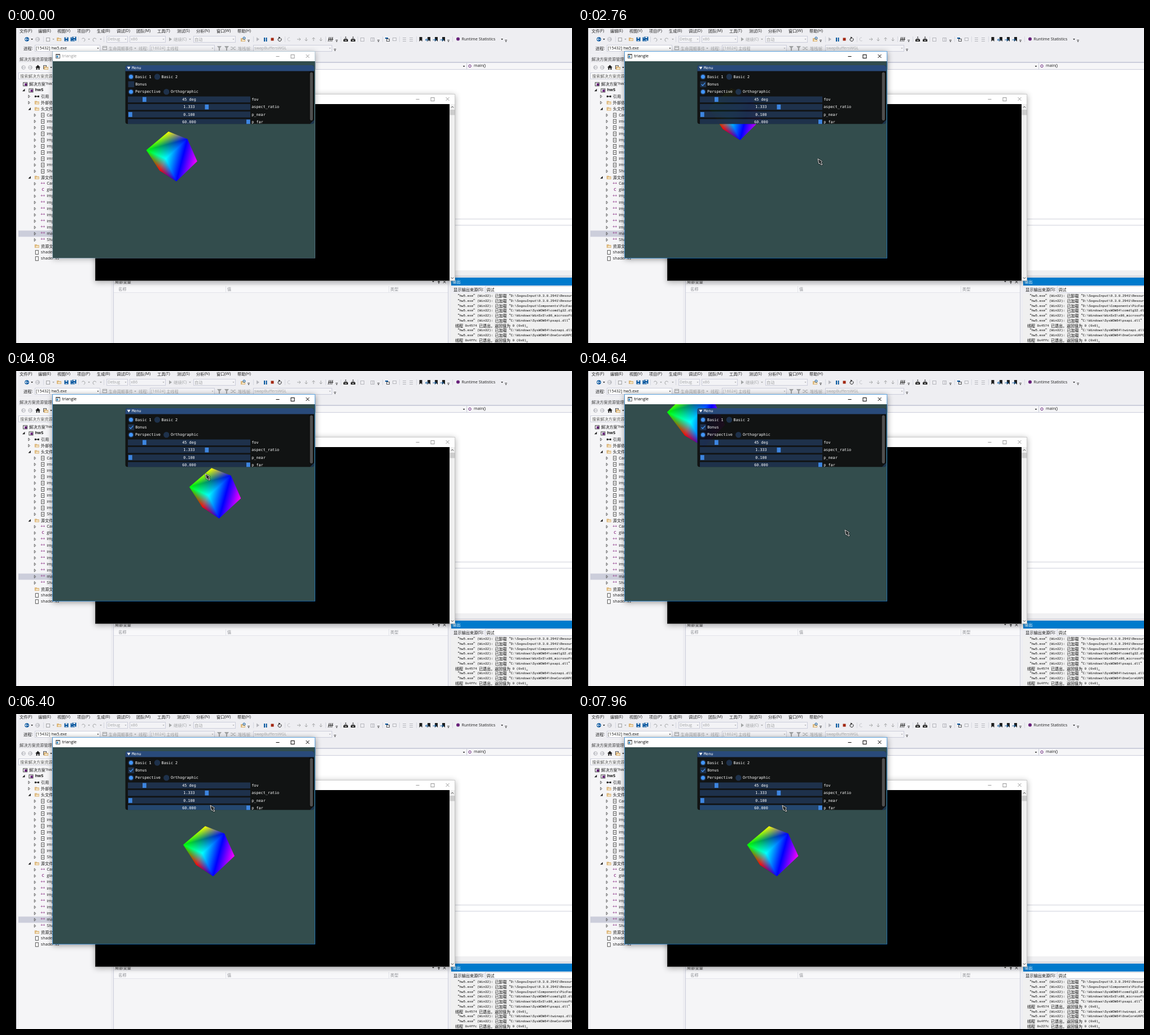
Write an HTML page with a canvas that moves like this. It is 1003x559 px and loops after 8 s.

```html
<!DOCTYPE html>
<html lang="zh">
<head>
<meta charset="utf-8">
<title>triangle</title>
<style>
html, body { margin: 0; width: 100%; height: 100%; overflow: hidden; background: #eeeef2; }
canvas { display: block; }
</style>
</head>
<body>
<canvas id="stage" width="1003" height="559"></canvas>
<script>
const g = document.getElementById('stage').getContext('2d');
const LOOP = 8000, INK = '#1e1e1e', GRAY = '#a2a4a5', BLUE = '#00539c', EDGE = '#ccceDB';
const VIEW = { x: 83, y: 59, w: 465, h: 349, cx: 315.5, cy: 233.5, focal: 421 };

// ---------- drawing helpers ----------
const rect = (x, y, w, h, color) => { g.fillStyle = color; g.fillRect(x, y, w, h); };
const box = (x, y, w, h, color, width = 1) => {
  g.strokeStyle = color; g.lineWidth = width; g.strokeRect(x + .5, y + .5, w - 1, h - 1);
};
const round = (x, y, w, h, r, color) => {
  g.fillStyle = color; g.beginPath(); g.roundRect(x, y, w, h, r); g.fill();
};
const disc = (x, y, r, color) => {
  g.fillStyle = color; g.beginPath(); g.arc(x, y, r, 0, 7); g.fill();
};
const ring = (x, y, r, color, from = 0, to = 6.3) => {
  g.strokeStyle = color; g.lineWidth = 1; g.beginPath(); g.arc(x, y, r, from, to); g.stroke();
};
const trace = pts => {
  g.beginPath();
  pts.forEach(([x, y]) => g.lineTo(x, y));
};
const poly = (pts, color) => { trace(pts); g.closePath(); g.fillStyle = color; g.fill(); };
const line = (pts, color, width = 1) => {
  trace(pts); g.strokeStyle = color; g.lineWidth = width; g.stroke();
};
const down = (x, y, color = INK, r = 1.8) => poly([[x - r, y - r / 2], [x + r, y - r / 2], [x, y + r / 2 + .3]], color);
const play = (x, y, color) => poly([[x - 2, y - 3.5], [x + 3, y], [x - 2, y + 3.5]], color);
const cross = (x, y, r, color) => {
  line([[x - r, y - r], [x + r, y + r]], color);
  line([[x + r, y - r], [x - r, y + r]], color);
};

// Chinese and Latin runs use their own fonts and sizes.
function text(s, x, y, color = INK, latin = '7.2px "Open Sans", sans-serif', wide = 7.2) {
  g.fillStyle = color;
  g.textBaseline = 'middle';
  for (const run of s.match(/[\u2014-\uffff]+|[^\u2014-\uffff]+/g)) {
    g.font = run[0] > '\u2013' ? `${wide}px "Noto Sans CJK SC", "Noto Sans CJK", sans-serif` : latin;
    g.fillText(run, x, y);
    x += g.measureText(run).width;
  }
}
const mono = (s, x, y, color = '#fff') => text(s, x, y, color, '6.77px "DejaVu Sans Mono", monospace');

function shadowed(x, y, w, h, strength) {
  g.save();
  g.shadowColor = `rgba(0,0,0,${strength})`;
  g.shadowBlur = 10;
  g.shadowOffsetY = 2;
  rect(x, y, w, h, '#fff');
  g.restore();
}
function windowButtons(x, y, color) {
  line([[x, y + .5], [x + 6, y + .5]], color);
  box(x + 26, y - 3, 7, 7, color);
  cross(x + 56, y, 3, color);
}

// ---------- IDE ----------
const MENUS = [[24, '文件(F)'], [57, '编辑(E)'], [91, '视图(V)'], [126, '项目(P)'], [161, '生成(B)'], [196, '调试(D)'],
  [231, '团队(M)'], [268, '工具(T)'], [303, '测试(S)'], [337, '分析(N)'], [373, '窗口(W)'], [410, '帮助(H)']];

function combo(x, y, w, label, color, back = '#f3f3f6') {
  rect(x, y - 6, w, 12, back);
  box(x, y - 6, w, 12, EDGE);
  text(label, x + 2, y, color);
  down(x + w - 4, y, color, 1.5);
}
function arrow(x, y, angle, color) {
  g.save();
  g.translate(x, y);
  g.rotate(angle);
  line([[-3, 0], [3, 0]], color);
  line([[.5, -2.5], [3, 0], [.5, 2.5]], color);
  g.restore();
}
function navButton(x, y, color, flip) {
  disc(x, y, 3.8, color);
  arrow(x, y, flip ? 0 : Math.PI, '#fff');
}
function disk(x, y) {
  rect(x - 3.5, y - 3.5, 7, 7, BLUE);
  rect(x - 1.5, y - 3.5, 3, 2.5, '#eeeef2');
  rect(x - 1.5, y + 1, 3, 2.5, '#9db9d6');
}
function folder(x, y) {
  rect(x - 4, y - 3, 4, 2, '#dcb67a');
  rect(x - 4, y - 2, 8, 5, '#dcb67a');
  rect(x - 2, y - .5, 5, 2.5, '#f4e6c9');
}
function page(x, y) {
  rect(x - 2.5, y - 3.5, 6, 7, '#fff');
  box(x - 3, y - 4, 6, 8, '#555');
}
function filePage(x, y) {
  page(x, y);
  line([[x - 1.5, y], [x + 1.5, y]], '#555');
}
function overflow(x) {
  line([[x - 2, 21.5], [x + 2, 21.5]], INK, .8);
  down(x, 24, INK, 1.5);
}

function toolbar() {
  MENUS.forEach(([x, s]) => text(s, x, 5.5));
  const y = 20;
  navButton(37, y, BLUE); down(46, y);
  ring(56, y, 3.5, '#b6b7bd'); arrow(56, y, 0, '#b6b7bd');
  box(71, 17, 7, 7, GRAY); down(84, y, GRAY);
  folder(94, y); disk(107, y); disk(118, y); disk(121, y - 1);
  ring(137, 21, 3, GRAY, 3.6, 7.6); down(147, y, GRAY);
  ring(157, 21, 3, GRAY, 1.8, 5.9); down(168, y, GRAY);
  combo(178, y, 38, 'Debug', GRAY);
  combo(219, y, 64, 'x86', GRAY);
  play(291, y, GRAY); text('继续(C)', 297, y, GRAY); down(326, y, GRAY);
  combo(332, y, 75, '自动', GRAY);
  folder(420, 21); ring(422, 18, 2, BLUE);
  play(446, y, '#b6b7bd');
  rect(457, 17, 2, 7, BLUE); rect(460.5, 17, 2, 7, BLUE);
  rect(469.5, 17.5, 5, 5, '#a1260d');
  ring(485, 20.5, 3, INK, -1, 4.2); poly([[483, 15.5], [486.5, 17], [483.5, 19.5]], INK);
  ring(502, 20, 3, '#c4c5ca', 1, 5);
  arrow(519, y, 0, GRAY);
  arrow(532, y, Math.PI / 2, GRAY); arrow(545, y, -Math.PI / 2, GRAY); arrow(558, y, Math.PI / 2, GRAY);
  [573, 576, 579].forEach(x => line([[x - 2, 24], [x, 16]], INK));
  line([[571, 20], [580, 20]], INK);
  [602, 615].forEach(x => {
    rect(x - 4, 20, 8, 4, INK); rect(x - 2, 21.5, 4, 1, '#fff'); arrow(x, 18, Math.PI / 2, INK);
  });
  box(628, 17, 7, 7, '#b6b7bd'); box(646, 17, 7, 7, '#b6b7bd'); line([[650, 17], [650, 24]], '#b6b7bd');
  rect(672, 17, 5, 2, BLUE); box(674, 19, 6, 5, '#555');
  box(685, 17, 7, 6, '#b6b7bd');
  [706, 718].forEach(x => [17, 20, 23].forEach(v => line([[x - 3, v + .5], [x + 3, v + .5]], '#b6b7bd')));
  const mark = (x, color) => poly([[x - 2.5, 16], [x + 2.5, 16], [x + 2.5, 24], [x, 21.5], [x - 2.5, 24]], color);
  mark(735, INK);
  [748, 761, 774].forEach(x => { mark(x + 1.5, INK); arrow(x - 1.5, 21, x === 748 ? Math.PI : 0, BLUE); });
  disc(801, 19.5, 3, '#68217a');
  text('Runtime Statistics', 807.5, y); down(879, y);
  [430, 586, 660, 784, 886].forEach(overflow);
  [66, 128, 173, 438, 494, 566, 593, 623, 667, 697, 727, 791].forEach(x => rect(x, 15, 1, 10, '#d6d8e0'));

  const v = 36;
  text('进程:', 31, v);
  combo(51, v, 116, '[15432] hw5.exe', INK, '#fff');
  box(171, 32, 8, 7, GRAY); line([[171, 34.5], [179, 34.5]], GRAY);
  text('生命周期事件', 182, v, GRAY); down(229, v, GRAY);
  text('线程:', 235, v, GRAY);
  combo(255, v, 115, '[16024] 主线程', GRAY);
  poly([[374, 32], [382, 32], [379, 36], [379, 40], [377, 40], [377, 36]], GRAY);
  poly([[387, 32], [395, 32], [392, 36], [392, 40], [390, 40], [390, 36]], GRAY);
  line([[398, 34], [401, 34], [404, 38], [407, 38]], GRAY); line([[398, 38], [401, 38], [404, 34], [407, 34]], GRAY);
  text('堆栈帧:', 411, v, GRAY);
  combo(438, v, 140, 'swapBuffersWGL', GRAY);
  line([[581, 37.5], [585, 37.5]], INK, .8); down(583, 40, INK, 1.5);
}

const HEADERS = ['Camera.h', 'imconfig.h', ...Array(4).fill('imgui.h'), ...Array(3).fill('imstb.h'), 'Shader.h'];
const SOURCES = ['Camera.cpp', 'glad.c', ...Array(6).fill('imgui.cpp'), 'main.cpp', 'Shader.cpp'];
// Each row: indent level, label, kind, open state (undefined means no arrow).
const TREE = [[0, "解决方案'hw5'(1 个项目)", 'solution'], [1, 'hw5', 'project', true], [2, '引用', 'refs', false],
  [2, '外部依赖项', 'folder', false], [2, '头文件', 'folder', true],
  ...HEADERS.map(s => [3, s, 'header', false]), [2, '源文件', 'folder', true],
  ...SOURCES.map(s => [3, s, s.endsWith('.c') ? 'c' : 'cpp', false]),
  [2, '资源文件', 'folder'], [2, 'shader.fs', 'page'], [2, 'shader.vs', 'page']];

function treeIcon(kind, x, y) {
  if (kind === 'folder') folder(x, y);
  else if (kind === 'header') filePage(x, y);
  else if (kind === 'page') page(x, y);
  else if (kind === 'cpp') text('++', x - 4, y - .5, '#9b4f96', 'bold 7px "Open Sans", sans-serif');
  else if (kind === 'c') text('C', x - 2, y, '#9b4f96', 'bold 7px "Open Sans", sans-serif');
  else if (kind === 'refs') { rect(x - 4, y - 1.5, 3, 3, INK); rect(x + 1, y - 1.5, 3, 3, INK); line([[x - 1, y], [x + 1, y]], INK); }
  else { box(x - 4, y - 3, 8, 7, '#444'); rect(x - 1, y - 1, 4, 4, '#68217a'); }
}

function explorer() {
  rect(22, 47, 164, 512, '#f5f5f7');
  rect(22, 48, 164, 14, '#eeeef2');
  text('解决方案资源管理器', 24, 55, '#444');
  [31, 43].forEach((x, i) => { ring(x, 70, 3.3, '#b6b7bd'); arrow(x, 70, i ? 0 : Math.PI, '#b6b7bd'); });
  poly([[52, 70], [56.5, 65.5], [61, 70], [59.5, 70], [59.5, 74], [53.5, 74], [53.5, 70]], INK);
  rect(55.5, 71, 2, 3, '#eeeef2');
  box(66, 66, 6, 7, '#555'); folder(71, 71); down(80, 70);
  rect(22, 79, 164, 12, '#fff');
  box(22, 79, 164, 12, EDGE);
  text('搜索解决方案资源管理器', 25, 85, '#555');
  TREE.forEach(([level, label, kind, open], i) => {
    const y = 99.3 + 11.07 * i, x = 34 + level * 10.4;
    if (label === 'main.cpp') rect(22, y - 5.5, 164, 11, '#ccceDB');
    if (open) poly([[x - 11, y + 2], [x - 15.5, y + 2], [x - 11, y - 2.5]], INK);
    else if (open === false) {
      line([[x - 15, y - 2.5], [x - 12.3, y], [x - 15, y + 2.5], [x - 15, y - 2.5]], '#555', .9);
    }
    treeIcon(kind, x, y);
    text(label, x + 7, y, INK, (kind === 'project' ? 'bold ' : '') + '7.2px "Open Sans", sans-serif');
  });
}

const load = (path, verb = '加') => `“hw5.exe”(Win32): 已${verb}载“${path}`;
const ended = id => `线程 ${id} 已退出，返回值为 0 (0x0)。`;
const SYS = 'C:\\Windows\\SysWOW64\\', IME = 'D:\\SogouInput\\';
const LOG = [load(IME + '9.3.0.2941\\Resource', '卸'), load(IME + '9.3.0.2941\\Resource'),
  load(IME + 'Components\\PicFace'), load(SYS + 'comdlg32.dll”'), load('C:\\Windows\\WinSxS\\x86_microsoft.'),
  load(SYS + 'psapi.dll”'), ended('0x4574'), load(SYS + 'twinapi.dll”'), load(SYS + 'OneCoreUAPCommon'),
  ended('0x4ffc'), ended('0x227c')];

function ide(t) {
  rect(0, 0, 1003, 559, '#eeeef2');
  toolbar();
  explorer();

  rect(548, 60, 455, 1, EDGE);
  rect(548, 61, 455, 13, '#f6f6f8');
  box(548, 61, 269, 13, EDGE); box(816, 61, 190, 13, EDGE);
  down(811.5, 68);
  ring(822, 67.5, 2.2, '#68217a');
  text('main()', 829, 67.5);
  rect(548, 74, 455, 264, '#fff');
  rect(548, 338, 455, 2, '#e6e7ec');
  rect(548, 340, 455, 9, '#fff');
  rect(548, 349, 455, 2, '#e6e7ec');
  rect(548, 351, 455, 79, '#fff');
  rect(548, 430, 455, 9, '#f0f0f2');
  rect(548, 439, 455, 4, '#dcdde3');

  rect(191, 444, 592, 115, '#f5f5f7');
  rect(191, 444, 592, 12, '#eeeef2');
  text('局部变量', 193, 450.5, '#444');
  down(757, 450, INK);
  line([[765, 450.5], [769, 450.5]], INK); line([[767, 447], [767, 454]], INK);
  cross(777, 450.5, 2.3, INK);
  rect(191, 457, 592, 12, '#f8f8fa');
  rect(191, 469, 592, 1, '#e3e4ea');
  [[199, '名称'], [392, '值'], [681, '类型']].forEach(([x, s]) => text(s, x, 463, '#8d8f94'));
  [389, 678].forEach(x => rect(x, 458, 1, 11, '#e3e4ea'));
  rect(190, 444, 1, 115, EDGE); rect(783, 444, 1, 115, EDGE);

  rect(789, 443, 214, 116, '#eeeef2');
  rect(789, 443, 214, 14, '#007acc');
  text('输出', 791, 450.5, '#fff');
  text('显示输出来源(S):', 793, 464);
  rect(849, 458, 154, 12, '#fff');
  box(849, 458, 160, 12, EDGE);
  text('调试', 851, 464);
  rect(789, 471, 214, 88, '#f0f0f0');
  const first = t >= 6800 ? 1 : 0;
  LOG.slice(first, first + 10).forEach((s, i) =>
    text(s, s[0] === '线' ? 796 : 796.5, 475.5 + 8.75 * i, '#000', '5.85px "Liberation Mono", monospace', 7));
  rect(0, 0, 18, 559, '#000');
}

function consoleWindow() {
  shadowed(158, 117, 638, 331.5, .32);
  windowButtons(726.5, 126, '#999');
  rect(158, 135, 628, 313.5, '#000');
  rect(786, 135, 10, 313.5, '#f0f0f0');
  rect(786.5, 145, 9, 9.5, '#cdcdcd');
  line([[788.8, 141.5], [791, 139.2], [793.2, 141.5]], '#444');
  line([[788.8, 442.5], [791, 444.8], [793.2, 442.5]], '#444');
  box(158, 117, 638, 332, 'rgba(110,110,110,.35)');
}

// ---------- the cube ----------
const CORNERS = { green: [314, 232], yellow: [353, 199], top: [387, 212], magenta: [405, 252],
  bottom: [367, 288], red: [337, 268], cyan: [348, 247] };
const COLORS = { green: '#0f0', yellow: '#ff0', top: '#00f', magenta: '#f0f', bottom: '#00f', red: '#f00', cyan: '#0ff' };
const FACES = ['green yellow top', 'green top cyan', 'top magenta bottom', 'top bottom cyan',
  'green cyan red', 'cyan bottom red'].map(s => s.split(' '));

// Turn the view by the mouse aim and project again.
function project([px, py], [mx, my], strafe) {
  const k = .172 * Math.PI / 180, yaw = (361 - mx) * k, pitch = (161 - my) * k;
  const { cx, cy, focal } = VIEW, x = px + strafe - cx, y = py - cy;
  const x1 = x * Math.cos(yaw) + focal * Math.sin(yaw);
  const z1 = focal * Math.cos(yaw) - x * Math.sin(yaw);
  const y2 = y * Math.cos(pitch) + z1 * Math.sin(pitch);
  const z2 = z1 * Math.cos(pitch) - y * Math.sin(pitch);
  return [cx + focal * x1 / z2, cy + focal * y2 / z2];
}

// Three fading fills added together blend the corner colours.
function blendTriangle(names, at) {
  names.forEach((name, i) => {
    const a = at[name], b = at[names[(i + 1) % 3]], c = at[names[(i + 2) % 3]];
    const ex = c[0] - b[0], ey = c[1] - b[1];
    const u = ((a[0] - b[0]) * ex + (a[1] - b[1]) * ey) / (ex * ex + ey * ey);
    const fade = g.createLinearGradient(a[0], a[1], b[0] + u * ex, b[1] + u * ey);
    fade.addColorStop(0, COLORS[name]);
    fade.addColorStop(1, '#000');
    poly([a, b, c], fade);
  });
}
function cube(aim, strafe) {
  const at = {};
  for (const name in CORNERS) at[name] = project(CORNERS[name], aim, strafe);
  poly(['green', 'yellow', 'top', 'magenta', 'bottom', 'red'].map(n => at[n]), '#000');
  g.globalCompositeOperation = 'lighter';
  FACES.forEach(f => blendTriangle(f, at));
  g.globalCompositeOperation = 'source-over';
}

// ---------- settings panel ----------
const FRAME = 'rgba(41,74,122,.54)', HOVER = 'rgba(66,150,250,.4)', ACCENT = '#4296fa';
const SLIDERS = [['45 deg', 'fov', 242], ['1.333', 'aspect_ratio', 352.5], ['0.100', 'p_near', 217], ['60.000', 'p_far', 426]];

function panel(mouse, bonus) {
  const over = (x, y, w, h) => mouse[0] >= x && mouse[0] < x + w && mouse[1] >= y && mouse[1] < y + h;
  const frameColor = (...area) => over(...area) ? HOVER : FRAME;
  g.save();
  g.beginPath(); g.roundRect(211.5, 66, 334.5, 104.3, 4); g.clip();
  rect(211, 66, 336, 105, 'rgba(15,15,15,.94)');
  rect(211, 66, 336, 10.5, '#294a7a');
  poly([[214.5, 68.8], [220.5, 68.8], [217.5, 73.6]], '#fff');
  mono('Menu', 223, 71.5);
  [[221.5, 86.5, 'Basic 1', 1], [268, 86.5, 'Basic 2', 0],
   [221.5, 113.3, 'Perspective', 1], [284.3, 113.3, 'Orthographic', 0]].forEach(([x, y, label, on]) => {
    disc(x, y, 5.2, frameColor(x - 5, y - 5, 50, 10));
    if (on) disc(x, y, 3.5, ACCENT);
    mono(label, x + 7.6, y + .3);
  });
  rect(216.5, 94.5, 10.7, 10.7, frameColor(216, 94, 34, 11));
  if (bonus) line([[218.8, 100], [221, 102.3], [225.2, 97.3]], ACCENT, 1.3);
  mono('Bonus', 229.2, 100.2);
  SLIDERS.forEach(([value, label, grab], i) => {
    const y = 121.5 + i * 13.35;
    rect(216, y, 217, 10.6, frameColor(216, y - 1, 217, 10.6));
    rect(grab, y + 1, 6.7, 8.6, '#3d85e0');
    g.textAlign = 'center'; mono(value, 324.5, y + 5.6);
    g.textAlign = 'left'; mono(label, 435.3, y + 5.6);
  });
  rect(537.5, 77, 8.5, 87, 'rgba(5,5,5,.53)');
  round(538.6, 78.5, 5.3, 85.5, 2.5, '#4f4f4f');
  poly([[546, 163], [546, 171], [538, 171]], 'rgba(66,150,250,.25)');
  g.restore();
}

function triangleWindow(t, mouse, strafe) {
  const active = t >= 1480, bonus = t >= 1560, ink = active ? '#000' : '#999';
  shadowed(83, 41, 465, 367, active ? .45 : .3);
  box(88, 46, 8, 8, '#666'); rect(88, 46, 8, 2, '#666'); rect(89.5, 49, 3, 3.5, '#3c8fc7');
  text('triangle', 99.5, 50.3, ink);
  windowButtons(478.5, 50, ink);
  g.save();
  g.beginPath(); g.rect(VIEW.x, VIEW.y, VIEW.w, VIEW.h); g.clip();
  rect(VIEW.x, VIEW.y, VIEW.w, VIEW.h, '#334d4d');
  cube(bonus ? mouse : [412.3, 173], strafe);
  panel(mouse, bonus);
  g.restore();
  box(82, 41, 466, 368, active ? 'rgba(26,127,212,.7)' : 'rgba(110,150,175,.5)');
}

// ---------- motion ----------
const MOUSE = [[120, 922, 529], [920, 226, 109], [1120, 227, 104], [1280, 227, 102], [1480, 224, 97], [2080, 224, 97],
  [2760, 424, 231], [2840, 442, 240], [2920, 457, 248], [3600, 295, 119], [3680, 295, 119], [3720, 285, 111],
  [3800, 262, 120], [4480, 511, 290], [4560, 506, 292], [4640, 472, 281], [5160, 361, 161]];
const STRAFE = [[6400, 0], [7120, -47], [7240, -47], [7320, -56], [7960, -14.5]];

function track(keys, t) {
  const i = keys.findIndex(k => k[0] > t);
  if (i === 0) return keys[0].slice(1);
  if (i < 0) return keys[keys.length - 1].slice(1);
  const [t0, ...from] = keys[i - 1], [t1, ...to] = keys[i];
  const e = (1 - Math.cos(Math.PI * (t - t0) / (t1 - t0))) / 2;
  return from.map((v, n) => v + (to[n] - v) * e);
}

function pointer([x, y]) {
  g.save();
  g.translate(x, y);
  const shape = [[1, 1], [8.5, 5.5], [7, 7.8], [9, 11.3], [7, 12], [5, 9.6], [2.6, 9.4], [1, 1]];
  g.lineJoin = 'round';
  line(shape, 'rgba(0,0,0,.6)', 2.4);
  poly(shape, '#2a2f30');
  line(shape, '#e4e4e4', 1);
  g.restore();
}

function draw(now) {
  const t = Math.floor(now % LOOP / 40) * 40;
  const mouse = track(MOUSE, t);
  ide(t);
  consoleWindow();
  triangleWindow(t, mouse, track(STRAFE, t)[0]);
  if (t >= 120) pointer(mouse);
}

let start;
function tick(now) {
  start ??= now;
  draw(now - start);
  requestAnimationFrame(tick);
}
draw(0);
requestAnimationFrame(tick);
</script>
</body>
</html>
```
